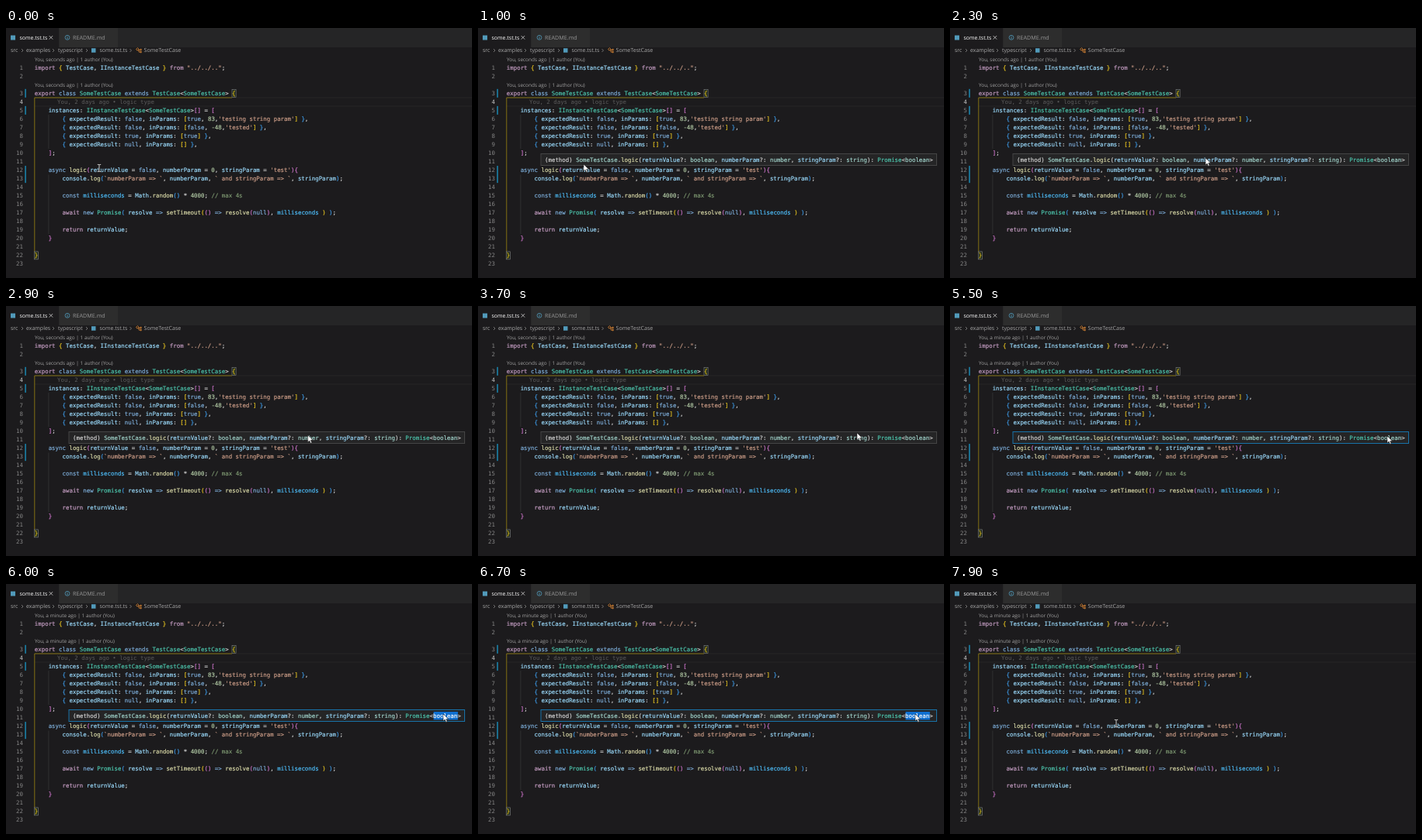
Animation of 600x323 px, one loop 8 s. Source, as an HTML page:

```html
<!DOCTYPE html>
<html lang="en">
<head>
<meta charset="utf-8">
<title>Editor hover</title>
<style>
  html, body { margin: 0; width: 100%; height: 100%; overflow: hidden; background: #1c1b1d; }
  svg { display: block; width: 100vw; height: 100vh; }
  text { white-space: pre; text-rendering: geometricPrecision; }
  .ui { font-family: "Open Sans", "Noto Sans", sans-serif; }
  .code { font: 7.42px "DejaVu Sans Mono", monospace; stroke-width: 0.16; }
</style>
</head>
<body>
<svg id="stage" viewBox="0 0 600 323" preserveAspectRatio="none"></svg>
<script>
const CHAR = 4.467, LEFT = 36.8, ROW = 11.03, LOOP = 8000;
const stage = document.getElementById('stage');

const COLORS = {
  string: '#d0a08a', comment: '#7f9a72', flow: '#c79fc5', word: '#7fb0dc', type: '#4ec9b0',
  primitive: '#a4d8cf', call: '#dcdcaa', number: '#b5cea8', constant: '#4fc1ff',
  name: '#9cdcfe', plain: '#d4d4d4'
};
const BRACKETS = ['#f0cc20', '#d478d0', '#3fa0f0'];
const TOKEN = new RegExp([
  /(?<string>"[^"]*"|'[^']*'|`[^`]*`)/,
  /(?<comment>\/\/.*)/,
  /(?<flow>\b(?:import|from|export|await|return)\b)/,
  /(?<word>\b(?:class|extends|async|const|new|true|false|null)\b|=>)/,
  /(?<type>(?<!import.*)\b(?:SomeTestCase|TestCase|IInstanceTestCase|Promise)\b)/,
  /(?<primitive>\b(?:boolean|number|string)\b)/,
  /(?<call>\b\w+(?=\())/,
  /(?<number>-?\b\d+\b)/,
  /(?<constant>\bmilliseconds\b)/,
  /(?<name>[A-Za-z]\w*)/,
  /(?<bracket>[()[\]{}])/,
  /(?<plain>\s+|.)/
].map(r => r.source).join('|'), 'g');

const LINES = [
  'import { TestCase, IInstanceTestCase } from "../../..";',
  '',
  'export class SomeTestCase extends TestCase<SomeTestCase> {',
  '',
  '    instances: IInstanceTestCase<SomeTestCase>[] = [',
  "        { expectedResult: false, inParams: [true, 83,'testing string param'] },",
  "        { expectedResult: false, inParams: [false, -48,'tested'] },",
  '        { expectedResult: true, inParams: [true] },',
  '        { expectedResult: null, inParams: [] },',
  '    ];',
  '',
  "    async logic(returnValue = false, numberParam = 0, stringParam = 'test'){",
  '        console.log(`numberParam => `, numberParam, ` and stringParam => `, stringParam);',
  '',
  '        const milliseconds = Math.random() * 4000; // max 4s',
  '',
  '        await new Promise( resolve => setTimeout(() => resolve(null), milliseconds ) );',
  '',
  '        return returnValue;',
  '    }',
  '',
  '}',
  ''
];

function add(tag, attrs, parent = stage, content = '') {
  const el = document.createElementNS('http://www.w3.org/2000/svg', tag);
  for (const key in attrs) el.setAttribute(key, attrs[key]);
  el.textContent = content;
  return parent.appendChild(el);
}
const box = (x, y, width, height, fill, parent, more) =>
  add('rect', { x, y, width, height, fill, ...more }, parent);
const stroke = (d, color, width = 1, parent) =>
  add('path', { d, fill: 'none', stroke: color, 'stroke-width': width }, parent);
const label = (x, y, text, fill, size) =>
  add('text', { x, y, fill, class: 'ui', 'font-size': size }, stage, text);
const mono = (x, y, fill, text, parent, more) =>
  add('text', { x, y, fill, class: 'code', ...more }, parent, text);
const span = (el, text, color) => add('tspan', { fill: color, stroke: color }, el, text);
const rowY = n => n < 3 ? 51 + (n - 1) * ROW : 84.3 + (n - 3) * ROW;

let depth = 0;
function highlight(el, source, nested) {
  for (const { 0: text, groups } of source.matchAll(TOKEN)) {
    const kind = Object.keys(groups).find(k => groups[k] !== undefined);
    let color = COLORS[kind] || COLORS.plain;
    if (kind === 'bracket' && nested) {
      const open = '([{'.includes(text);
      if (!open) depth--;
      color = BRACKETS[depth % 3];
      if (open) depth++;
    }
    span(el, text, color);
  }
}

// Tabs
box(0, 0, 600, 323, '#1c1b1d');
box(0, 0, 600, 25, '#252526');
box(0, 0, 68, 25, '#1c1b1d');
box(68.5, 0, 75.5, 25, '#2d2d2d');
box(6, 9.5, 6, 6, '#519aba');
label(17.5, 15.2, 'some.tst.ts', '#ffffff', 7);
stroke('M55.6 10l4.6 4.6m0-4.6l-4.6 4.6', '#d0d0d0', 0.8);
add('circle', { cx: 79, cy: 12.3, r: 2.9, fill: 'none', stroke: '#519aba', 'stroke-width': 0.8 });
stroke('M79 10.6v.9m0 .6v2', '#519aba', 0.9);
label(86, 15.2, 'README.md', '#969696', 7.2);

// Breadcrumbs
const crumb = '#a9a9a9';
label(6, 31.4, 'src', crumb, 7);
label(26, 31.4, 'examples', crumb, 7);
label(67, 31.4, 'typescript', crumb, 6.9);
box(110, 26.2, 5.5, 5.5, '#519aba');
label(120.5, 31.4, 'some.tst.ts', crumb, 7);
label(177.5, 31.4, 'SomeTestCase', crumb, 7.1);
for (const x of [20, 60, 103, 159.5]) stroke(`M${x} 27l2 2-2 2`, '#999', 0.7);
stroke('M167.5 27.4l2-1.8 1.6 1.6-2 2zM170 28.4h3M171 28.4v2.6h2M173 27.2h1.2v1.6h-1.2zM173 30.2h1.2v1.6h-1.2z', '#e08a35', 0.8);

// Gutter, guides and current line
stroke('M37 90H600M37 101H600', '#292929', 0.8);
stroke('M54.9 112V156M54.9 189.5V266', '#404040', 0.6);
stroke('M291 90H36.8V289', '#8f7b13', 0.9);
for (const [from, to] of [[3, 3], [5, 5], [12, 13]])
  box(24.3, rowY(from) - 5.5, 1.6, (to - from + 1) * ROW, '#1b81a8');
for (const [col, n] of [[57, 3], [0, 22]])
  box(LEFT + col * CHAR - 0.4, rowY(n) - 5, CHAR + 0.6, 10, '#1b251b', stage,
    { stroke: '#888', 'stroke-width': 0.6 });

LINES.forEach((line, i) => {
  const n = i + 1, y = rowY(n) + 2.5;
  mono(22, y, n === 4 ? '#c6c6c6' : '#858585', n, stage, { 'text-anchor': 'end' });
  const code = line.trimStart();
  highlight(mono(LEFT + (line.length - code.length) * CHAR, y, COLORS.plain, ''), code, true);
});
mono(66, rowY(4) + 2.5, '#5c5c5c', 'You, 2 days ago • logic type');
const lenses = [43, 75.8].map(y => label(37, y, '', '#a0a0a0', 6.45));

// Hover card
const card = add('g', {});
const frame = box(81, 162.5, 509.5, 15, '#252526', card, { 'stroke-width': 1 });
const selection = box(86 + 104 * CHAR, 165, 7 * CHAR, 10.5, '#0f6fd0', card);
const hint = mono(86, 172.5, COLORS.plain, '', card);
span(hint, '(method) ', COLORS.plain);
span(hint, 'SomeTestCase', COLORS.primitive);
highlight(hint, '.logic(returnValue?: boolean, numberParam?: number, stringParam?: string): Promise<', false);
const picked = span(hint, 'boolean', COLORS.primitive);
span(hint, '>', COLORS.plain);

// Pointers
const arrow = add('path', {
  d: 'M0 0V9l2.1-2 1.5 3.4 1.5-.7L3.7 6.4H6.6z', fill: '#fff', stroke: '#111', 'stroke-width': 0.5
});
const beam = add('g', {});
const beamPath = 'M-2.2-4.6h1.6l.6.6.6-.6h1.6M0-4V4M-2.2 4.6h1.6l.6-.6.6.6h1.6';
stroke(beamPath, '#111', 1.8, beam);
stroke(beamPath, '#f0f0f0', 0.9, beam);

// time, x, y
const PATH = [
  [0, 120, 181], [500, 122, 181], [1000, 136, 176], [1400, 180, 172], [2300, 329, 168],
  [2800, 385, 167], [3700, 488, 164], [4500, 560, 168], [5000, 563, 168], [7200, 563, 168],
  [7800, 214, 180], [LOOP, 214, 180]
];
function pointerAt(t) {
  const i = PATH.findIndex(p => p[0] > t);
  const [t0, x0, y0] = PATH[i - 1], [t1, x1, y1] = PATH[i];
  const k = (t - t0) / (t1 - t0), e = k * k * (3 - 2 * k);
  return [x0 + (x1 - x0) * e, y0 + (y1 - y0) * e];
}
const show = (el, on) => el.setAttribute('visibility', on ? 'inherit' : 'hidden');

function draw() {
  const t = performance.now() % LOOP;
  const hovering = t >= 600 && t < 7500;
  const onCard = t >= 900 && t < 7500;
  const selected = t >= 5900;
  const ago = t < 4600 ? 'seconds' : 'a minute';
  for (const lens of lenses) lens.textContent = `You, ${ago} ago | 1 author (You)`;

  show(card, hovering);
  show(selection, hovering && selected);
  frame.setAttribute('stroke', t < 4900 ? '#454545' : '#1872a8');
  const pickedColor = selected ? '#ffffff' : COLORS.primitive;
  picked.setAttribute('fill', pickedColor);
  picked.setAttribute('stroke', pickedColor);

  const pointer = onCard ? arrow : beam;
  pointer.setAttribute('transform', `translate(${pointerAt(t)})`);
  show(arrow, onCard);
  show(beam, !onCard);
  requestAnimationFrame(draw);
}
draw();
</script>
</body>
</html>
```
